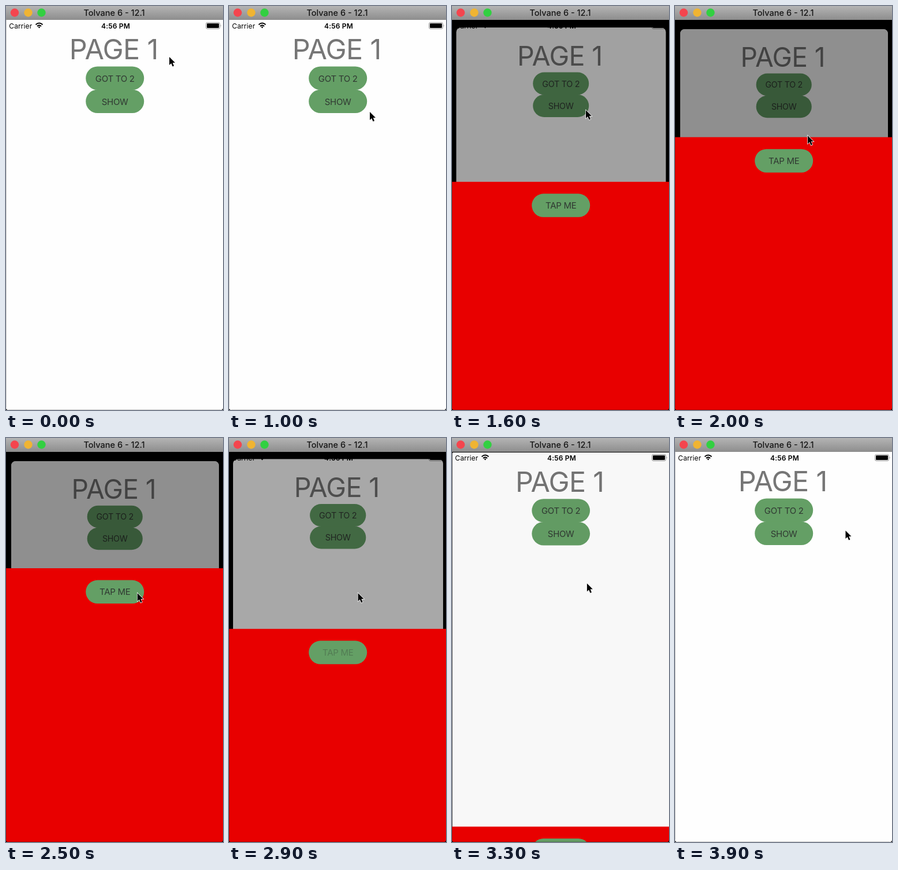
Animation of 376x698 px, one loop 4 s. Source, as an HTML page:

```html
<!DOCTYPE html>
<html lang="en">
<head>
<meta charset="utf-8">
<title>Sheet presentation</title>
<style>
  html, body { margin: 0; width: 100%; height: 100%; overflow: hidden; background: #000; }
  svg { display: block; width: 376px; height: 698px; }
  text { font-family: Inter, Roboto, sans-serif; text-anchor: middle; }
  .heading { font-size: 48.5px; letter-spacing: -.7px; fill: #767676; }
  .button rect { width: 101px; height: 40.5px; rx: 20.25px; fill: #649f65; }
  .button text { font-size: 15px; letter-spacing: -.3px; fill: #303832; }
  .status { font-size: 12px; }
  .status .time { font-weight: 600; letter-spacing: .2px; }
  .name { font-size: 14.5px; font-weight: 500; fill: #151515; }
</style>
</head>
<body>
<svg viewBox="0 0 376 698">
  <defs>
    <linearGradient id="bar" x2="0" y2="1">
      <stop stop-color="#b4b4b4"/>
      <stop offset="1" stop-color="#8d8d8d"/>
    </linearGradient>
  </defs>
  <rect width="376" height="698"/>

  <g id="page">
    <rect id="paper" width="378" height="674" fill="#fefefe"/>
    <text class="heading" x="186.6" y="68">PAGE 1</text>
    <g class="button" transform="translate(138.2 80.5)">
      <rect/>
      <text x="50.5" y="26">GOT TO 2</text>
    </g>
    <g class="button" transform="translate(138.2 120.5)">
      <rect/>
      <text id="show" x="50.5" y="26">SHOW</text>
    </g>
    <rect id="dim" width="378" height="674"/>
  </g>

  <g class="status">
    <text x="25.3" y="38.5" letter-spacing=".1">Carrier</text>
    <g fill="none" stroke="#000" stroke-width="2">
      <path d="M51.5 32.2Q57.5 26.8 63.5 32.2M54 35Q57.5 31.8 61 35"/>
      <path d="M55.6 36.2Q57.5 34.8 59.4 36.2L57.5 38.6Z" fill="#000" stroke="none"/>
    </g>
    <text class="time" x="190" y="38.5">4:56 PM</text>
    <rect x="346.5" y="28.5" width="24" height="11" rx="2.5" fill="none" stroke="#000" stroke-opacity=".4"/>
    <rect x="348" y="30" width="21" height="8" rx="1.2"/>
    <path d="M371.8 32q1.6 2 0 4z" fill-opacity=".5"/>
  </g>

  <g id="sheet">
    <rect width="376" height="698" fill="#e80000"/>
    <g class="button" transform="translate(138.2 20.6)">
      <rect/>
      <text id="tap" x="50.5" y="25.7">TAP ME</text>
    </g>
  </g>

  <path d="M0 694Q0 698 4 698H0ZM376 694Q376 698 372 698H376Z"/>
  <path d="M.5 24V694M4 697.5H372" stroke="#000" stroke-opacity=".2"/>
  <rect width="376" height="24" fill="url(#bar)"/>
  <circle cx="15" cy="11.5" r="7.2" fill="#f4454e"/>
  <circle cx="38.5" cy="11.5" r="7.2" fill="#f0b432"/>
  <circle cx="61.5" cy="11.5" r="7.2" fill="#32d041"/>
  <text class="name" x="187.5" y="17">Tolvane 6 - 12.1</text>

  <path id="cursor" d="M0 0V14L3.2 11L5.6 16.5L8 15.5L5.8 10.1H10Z" stroke="#fff" stroke-width="1.4" paint-order="stroke"/>
</svg>
<script>
const LOOP = 4000, STEP = 100;
const BOTTOM = 698, SHEET_TOP = 225, CENTER = 188.75;
const PRESENT = { at: 1321, rate: 11.6 };
const DISMISS = { at: 2805, rate: 9.3 };

// Places where the pointer pauses or turns
const stops = [
  { t: 0, x: 283, y: 88 },
  { t: 600, x: 283, y: 220 },
  { t: 1000, x: 244, y: 183 },
  { t: 1400, x: 227, y: 177 },
  { t: 1600, x: 232, y: 180 },
  { t: 2400, x: 228, y: 268 },
  { t: 3100, x: 222.5, y: 268 },
  { t: 3900, x: 295.5, y: 160 }
];

const $ = id => document.getElementById(id);
const set = (id, name, value) => $(id).setAttribute(name, value);
const clamp = v => Math.min(1, Math.max(0, v));
const smooth = u => u * u * (3 - 2 * u);

function pointer(t) {
  const next = Math.max(1, stops.findIndex(s => s.t >= t));
  const a = stops[next - 1], b = stops[next];
  const u = smooth((t - a.t) / (b.t - a.t));
  return [a.x + (b.x - a.x) * u, a.y + (b.y - a.y) * u];
}

// Remaining distance of a critically damped spring
function spring(t, { at, rate }) {
  const x = Math.max(0, t - at) / 1000 * rate;
  return (1 + x) * Math.exp(-x);
}

// Button titles dim while held, then fade back in
const title = (t, down, up) => t < down ? 1 : .2 + .8 * clamp((t - up) / 300);

function draw(t) {
  let open = t < DISMISS.at ? 1 - spring(t, PRESENT) : spring(t, DISMISS);
  if (open < .003) open = 0;

  const scale = 1 - .048 * open;
  const radius = 8 * clamp(open * 4);
  set('page', 'transform', `translate(${CENTER * (1 - scale)} ${24 + 16 * open}) scale(${scale})`);
  set('paper', 'rx', radius);
  set('dim', 'rx', radius);
  set('dim', 'opacity', .44 * open);
  set('sheet', 'transform', `translate(0 ${BOTTOM - (BOTTOM - SHEET_TOP) * open})`);
  set('show', 'opacity', title(t, 1200, 1300));
  set('tap', 'opacity', title(t, 2700, 2850));
  set('cursor', 'transform', `translate(${pointer(t)})`);
}

function tick() {
  const t = performance.now() % LOOP;
  draw(Math.floor(t / STEP) * STEP);
  requestAnimationFrame(tick);
}
tick();
</script>
</body>
</html>
```
